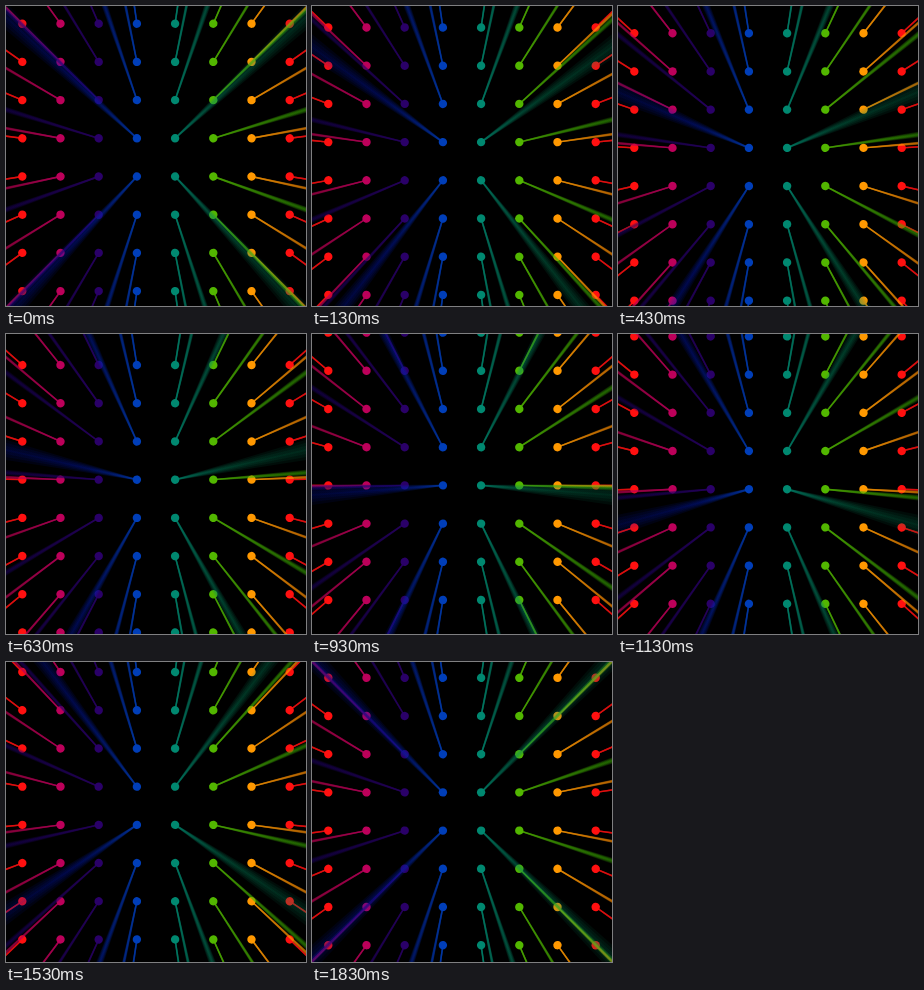
An HTML page with a canvas that plays this animation: 300 by 300 pixels, repeating every 1.93 s.

```html
<!DOCTYPE html>
<html lang="en">
<head>
<meta charset="utf-8">
<title>Light rods</title>
<style>
  html, body { margin: 0; width: 100%; height: 100%; overflow: hidden; background: #000; }
  canvas { display: block; width: 100vw; height: 100vh; }
</style>
</head>
<body>
<canvas id="stage"></canvas>
<script>
const SIZE = 300, CENTER = SIZE / 2, GAP = 38.2;
const STEPS = 20, LOOP = 1930, FIRST_HOLD = 30, HOLD = 100;
const DOT_RADIUS = 4.2, REACH = 330;
const ROD_HALF = 0.7, BLUR = 1, LAYERS = 4, OPACITY = 0.9;

// Colour wheel from left to right, closing on red again
const WHEEL = ['#ff1010', '#bc005a', '#2a0068', '#003eb8', '#008870', '#52b600', '#ff9800'];

const canvas = document.getElementById('stage');
const ctx = canvas.getContext('2d');
const ratio = window.devicePixelRatio || 1;
canvas.width = canvas.height = SIZE * ratio;

const channels = hex => [1, 3, 5].map(i => parseInt(hex.slice(i, i + 2), 16));

// Distant light turns purer: the weaker channels fade first
const purify = (color, amount) => {
  const peak = Math.max(...color);
  return color.map(v => Math.round(v * (1 - amount * (1 - v / peak))));
};

function rodGradient(radius, color) {
  const gradient = ctx.createLinearGradient(radius, 0, REACH, 0);
  for (let i = 0; i <= 10; i++) {
    const t = (i / 10) ** 2;
    const scale = 1 + (REACH / radius - 1) * t;
    const shade = purify(color, Math.min(1, (scale - 1) / 3));
    const total = OPACITY * scale ** -0.55;
    const alpha = 1 - (1 - total) ** (1 / LAYERS);
    gradient.addColorStop(t, `rgba(${shade.join()},${alpha})`);
  }
  return gradient;
}

// A rod running towards the viewer: it widens, blurs and fades with perspective
function drawRod(radius, color) {
  const scale = REACH / radius;
  ctx.fillStyle = rodGradient(radius, color);
  for (let layer = 0; layer < LAYERS; layer++) {
    const softness = BLUR * (2 * layer / (LAYERS - 1) - 1);
    const end = ROD_HALF * scale + softness * (scale - 1) * 0.65;
    ctx.beginPath();
    ctx.moveTo(radius, -ROD_HALF);
    ctx.lineTo(REACH, -end);
    ctx.lineTo(REACH, end);
    ctx.lineTo(radius, ROD_HALF);
    ctx.fill();
  }
}

function drawDot({ x, y, radius, color }) {
  ctx.save();
  ctx.translate(CENTER, CENTER);
  ctx.rotate(Math.atan2(y, x));
  drawRod(radius, color);
  ctx.fillStyle = `rgb(${color.join()})`;
  ctx.beginPath();
  ctx.arc(radius, 0, DOT_RADIUS, 0, Math.PI * 2);
  ctx.fill();
  ctx.restore();
}

function draw(step) {
  const dots = [];
  const shift = step / STEPS * GAP - 17.7;
  for (let row = -4; row <= 4; row++) {
    for (let column = 0; column <= WHEEL.length; column++) {
      const x = (column - WHEEL.length / 2) * GAP;
      const y = row * GAP + shift;
      const color = channels(WHEEL[column % WHEEL.length]);
      dots.push({ x, y, color, radius: Math.hypot(x, y) });
    }
  }
  // Inner rods come closest to the viewer, so they go on top
  dots.sort((a, b) => b.radius - a.radius);

  ctx.setTransform(ratio, 0, 0, ratio, 0, 0);
  ctx.fillStyle = '#000';
  ctx.fillRect(0, 0, SIZE, SIZE);
  dots.forEach(drawDot);
}

let shown = -1;
function tick() {
  const time = performance.now() % LOOP;
  const step = time < FIRST_HOLD ? 0 : 1 + Math.floor((time - FIRST_HOLD) / HOLD);
  if (step !== shown) draw(shown = step);
  requestAnimationFrame(tick);
}
tick();
</script>
</body>
</html>
```
